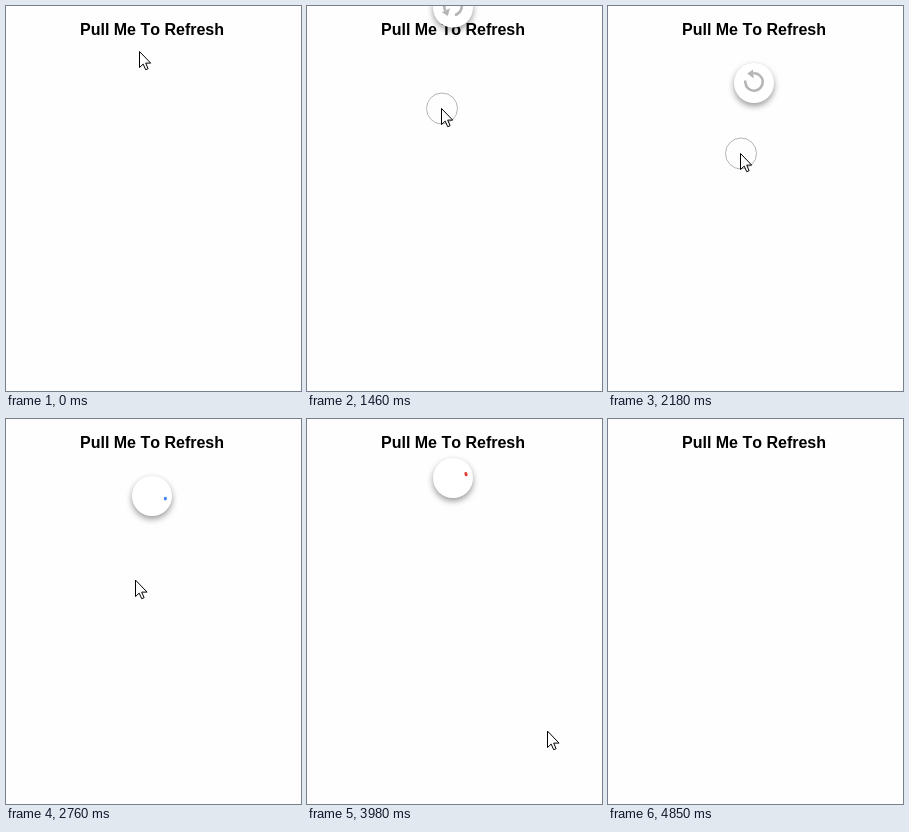
Write an HTML page with a canvas that moves like this. It is 295 px wide and 385 px high and loops after 6 s.

```html
<!DOCTYPE html>
<html lang="en">
<head>
<meta charset="utf-8">
<title>Pull to refresh</title>
<style>
  html, body { margin: 0; width: 100%; height: 100%; overflow: hidden; background: #fefefe; }
  h1 {
    position: absolute; left: 0; top: 0; width: 292px; margin: 0;
    font: bold 16px/48px "Liberation Sans", Arial, sans-serif;
    font-kerning: none; text-align: center; color: #000;
  }
  canvas { position: absolute; left: 0; top: 0; }
</style>
</head>
<body>
<h1>Pull Me To Refresh</h1>
<canvas id="stage" width="295" height="385"></canvas>
<script>
const ctx = document.getElementById('stage').getContext('2d');
const LOOP = 6000, PRESS = 800, PULLED = 2420, RELEASE = 2760, LEAVE = 4580, DONE = 4850;
const UPDATE = 80.4, SPIN_PERIOD = 1305;
const DISC_X = 146, PULL_Y = 77, REST_Y = 59;
const SPIN_COLORS = [[66, 133, 244], [222, 62, 53], [247, 194, 35]];

// Pointer path after release: [time, x, y]
const WANDER = [
  [RELEASE, 129, 161], [3400, 154, 166], [3966, 240, 312], [LEAVE, 272, 358], [DONE, 274, 390]
];

const pointerShape = new Path2D('M0 0V16L3.7 12.6L6.2 18.2L8.6 17.2L6.2 11.6H11.2Z');

const rad = deg => deg * Math.PI / 180;
const mix = (a, b, k) => a + (b - a) * k;
const ease = x => x * x * (3 - 2 * x);
const progress = (t, from, to) => Math.min(1, Math.max(0, (t - from) / (to - from)));

// The screen refreshes at a low, steady rate, in step with each press and release.
function lastUpdate(t) {
  const start = t < RELEASE ? PRESS : RELEASE;
  return start + Math.floor((t - start) / UPDATE + 0.01) * UPDATE;
}

function pointerAt(t) {
  if (t < RELEASE) {
    const u = progress(t, PRESS, PULLED);
    return [133 + 3 * u - 7 * u ** 4, 45 + 116 * u ** 0.765];
  }
  const i = WANDER.findIndex(key => key[0] > t);
  const [t0, x0, y0] = WANDER[i - 1], [t1, x1, y1] = WANDER[i];
  const k = progress(t, t0, t1);
  return [mix(x0, x1, k), mix(y0, y1, k)];
}

function discAt(t, pointerY) {
  if (t < RELEASE) return Math.min(PULL_Y, 3 + (pointerY - 103) * 1.88);
  const settle = ease(progress(t, RELEASE, RELEASE + 250));
  return mix(PULL_Y, REST_Y, settle) - 50 * progress(t, LEAVE, DONE) ** 2;
}

function circle(x, y, r) {
  ctx.beginPath();
  ctx.arc(x, y, r, 0, Math.PI * 2);
}

function drawDisc(y) {
  ctx.save();
  ctx.shadowColor = 'rgba(0,0,0,.4)';
  ctx.shadowBlur = 6;
  ctx.shadowOffsetY = 3;
  ctx.fillStyle = '#fff';
  circle(DISC_X, y, 20);
  ctx.fill();
  ctx.restore();
}

function drawPullIcon(y) {
  ctx.save();
  ctx.translate(DISC_X, y - 1);
  ctx.rotate(rad(45 + (y - 50) * 1.5));
  ctx.strokeStyle = ctx.fillStyle = '#b5b5b5';
  ctx.lineWidth = 2.6;
  ctx.beginPath();
  ctx.arc(0, 0, 8.7, Math.PI, rad(105));
  ctx.stroke();
  ctx.beginPath();
  ctx.moveTo(-12.5, 0);
  ctx.lineTo(-3.5, 0);
  ctx.lineTo(-9, 6);
  ctx.fill();
  ctx.restore();
}

function drawSpinner(y, t) {
  const turns = 0.03 + (t - RELEASE) / SPIN_PERIOD;
  const phase = turns % 1, index = Math.floor(turns);
  const growing = phase < 0.5;
  const k = ease(phase * 2 % 1);
  const start = phase * 270 + (growing ? mix(0, 135, k) : mix(135, 450, k));
  const length = Math.max(3, 268 * (growing ? k : 1 - k));
  const color = SPIN_COLORS[index].map((c, i) =>
    Math.round(mix(c, SPIN_COLORS[index + 1][i], ease(phase))));
  ctx.strokeStyle = `rgb(${color})`;
  ctx.lineWidth = 2.9;
  ctx.lineCap = 'round';
  ctx.beginPath();
  ctx.arc(DISC_X, y, 13.6, rad(start), rad(start + length));
  ctx.stroke();
}

function drawPointer(x, y, pressed) {
  ctx.save();
  ctx.translate(Math.round(x) + 0.5, Math.round(y) + 0.5);
  ctx.lineWidth = 1;
  if (pressed) {
    ctx.strokeStyle = '#b4b4b4';
    circle(0.5, 0, 15.5);
    ctx.stroke();
  }
  ctx.fillStyle = '#fff';
  ctx.strokeStyle = '#000';
  ctx.fill(pointerShape);
  ctx.stroke(pointerShape);
  ctx.restore();
}

function render(now) {
  ctx.clearRect(0, 0, 295, 385);
  if (now >= DONE) return;
  const t = lastUpdate(now);
  const [x, y] = pointerAt(t);
  const pulling = t >= PRESS && t < RELEASE;
  if (t >= PRESS) {
    const discY = discAt(t, y);
    drawDisc(discY);
    if (pulling) drawPullIcon(discY);
    else drawSpinner(discY, t);
  }
  drawPointer(x, y, pulling);
}

const origin = performance.now();
function tick() {
  render((performance.now() - origin) % LOOP);
  requestAnimationFrame(tick);
}
tick();
</script>
</body>
</html>
```
